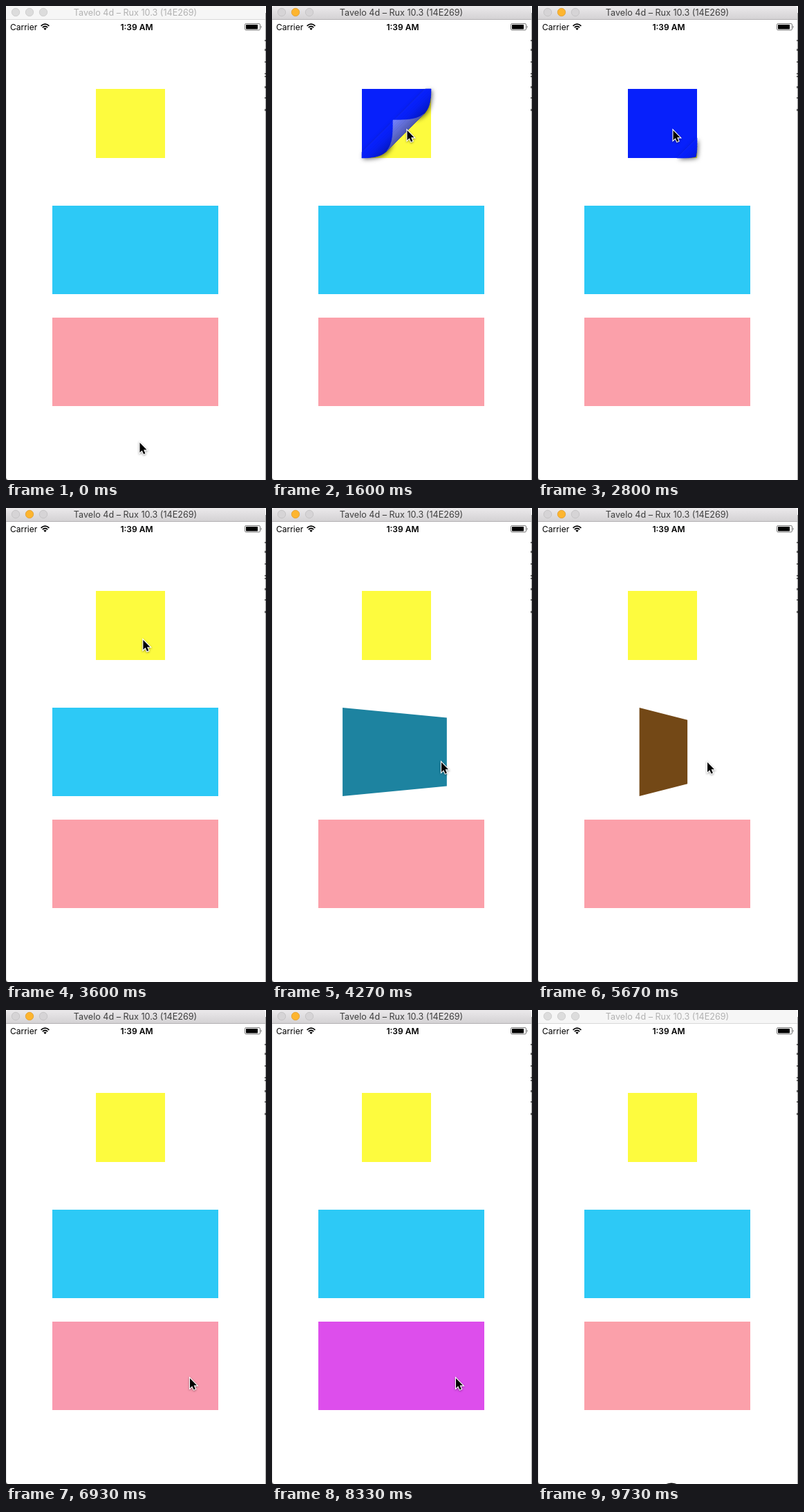
Recreate the animation shown at these times as an HTML page with a canvas. Size 376 by 686 pixels, loop 9790 ms.

```html
<!DOCTYPE html>
<html lang="en">
<head>
<meta charset="utf-8">
<title>View transitions</title>
<style>
  html, body { margin: 0; width: 100%; height: 100%; overflow: hidden; background: #fff; }
  svg, canvas { position: absolute; left: 0; top: 0; width: 376px; height: 686px; }
  text { font-family: Inter, "Liberation Sans", sans-serif; }
  #bar { fill: #f6f6f6; }
  #rule { fill: #d9d9d9; }
  #title { font-size: 12.6px; fill: #b1b1b1; text-anchor: middle; }
  .light { fill: #dcdcdc; stroke: #cacaca; stroke-width: .8; }
  .active #bar { fill: url(#metal); }
  .active #rule { fill: #b3b1b3; }
  .active #title { fill: #3d3d3d; }
  .active .light { fill: #d6d4d6; stroke: #c1bfc1; }
  .active #mini { fill: #fdb52f; stroke: #df9c2c; }
  .status { font-size: 12px; }
</style>
</head>
<body>
<svg id="chrome" viewBox="0 0 376 686">
  <defs>
    <linearGradient id="metal" x2="0" y2="1">
      <stop stop-color="#ebe9eb"/><stop offset="1" stop-color="#d3d1d3"/>
    </linearGradient>
  </defs>
  <path id="bar" d="M0 20V4Q0 0 4 0H371Q375 0 375 4V20Z"/>
  <rect id="rule" y="19" width="375" height="1"/>
  <circle class="light" cx="14" cy="9" r="5.7"/>
  <circle class="light" id="mini" cx="34" cy="9" r="5.7"/>
  <circle class="light" cx="54" cy="9" r="5.7"/>
  <text id="title" x="187" y="14">Tavelo 4d – Rux 10.3 (14E269)</text>

  <text class="status" x="6" y="34.6">Carrier</text>
  <text class="status" x="189" y="34.6" text-anchor="middle" font-weight="600">1:39 AM</text>
  <g fill="none" stroke="#000" stroke-width="1.7">
    <path d="M50.6 28.8Q56.5 23.4 62.4 28.8"/>
    <path d="M52.8 31.2Q56.5 27.8 60.2 31.2"/>
  </g>
  <path d="M54.3 32.6Q56.5 30.8 58.7 32.6L56.5 35Z"/>
  <rect x="345.5" y="25.5" width="22" height="9.4" rx="1.8" fill="#fff" stroke="#555" stroke-width=".8"/>
  <rect x="347" y="27" width="17" height="6.4" rx=".6"/>
  <path d="M368.8 28.4Q370.4 30.2 368.8 32Z"/>

  <path d="M375.5 10V686" stroke="#a5a5a5"/>
  <path d="M.25 20V686" stroke="#c4c4c4" stroke-width=".5"/>
  <path d="M375 49v2M375 62v3M375 80v2M375 97v2M375 101v2M375 116v3M375 132v2M375 149v3"
        stroke="#444" stroke-width="1.6"/>
  <path d="M0 682V686H3Q0 685 0 682Z" fill="#555"/>
</svg>
<canvas id="view"></canvas>
<script>
const LOOP = 9790, W = 376, H = 686;
const YELLOW = [253, 251, 62], BLUE = [7, 32, 251];
const CYAN = [45, 201, 246], ORANGE = [253, 159, 48];
const PINK = [251, 160, 170], ORCHID = [215, 60, 250], WHITE = [255, 255, 255];

const chrome = document.getElementById('chrome');
const view = document.getElementById('view');
const ctx = view.getContext('2d');
const dpr = window.devicePixelRatio || 1;
view.width = W * dpr;
view.height = H * dpr;

const clamp = v => Math.min(1, Math.max(0, v));
const lerp = (a, b, k) => a + (b - a) * k;
const mix = (a, b, k) => a.map((v, i) => lerp(v, b[i], k));
const rgb = (c, shade = 1) => `rgb(${c.map(v => Math.round(v * shade)).join()})`;

// cubic-bezier(.42, 0, .58, 1)
function ease(x) {
  let lo = 0, hi = 1, u = .5;
  for (let i = 0; i < 20; i++) {
    const bx = 3 * u * (1 - u) * (.42 * (1 - u) + .58 * u) + u ** 3;
    if (bx < x) lo = u; else hi = u;
    u = (lo + hi) / 2;
  }
  return u * u * (3 - 2 * u);
}
const step = (t, start, length = 1000) => ease(clamp((t - start) / length));

function box(x, y, w, h, color) {
  ctx.fillStyle = rgb(color);
  ctx.fillRect(x, y, w, h);
}

function trace(points) {
  points.forEach(([x, y], i) => i ? ctx.lineTo(x, y) : ctx.moveTo(x, y));
  ctx.closePath();
}

function polygon(points, fill) {
  ctx.beginPath();
  trace(points);
  ctx.fillStyle = fill;
  ctx.fill();
}

// ---- page curl: a square rolled on a diagonal cylinder ----
const SIZE = 100, DIAG = SIZE * Math.SQRT2, RADIUS = 24, END = -30;
const PAGE = [[0, 0], [SIZE, 0], [SIZE, SIZE], [0, SIZE]];
const along = p => (p[0] + p[1]) * Math.SQRT1_2;

// Keeps the part of a polygon where sign * (along - at) >= 0.
function cut(points, at, sign) {
  const out = [];
  points.forEach((p, i) => {
    const q = points[(i + 1) % points.length];
    const a = sign * (along(p) - at), b = sign * (along(q) - at);
    if (a >= 0) out.push(p);
    if (a * b < 0) out.push(mix(p, q, a / (a - b)));
  });
  return out;
}

function roll(p, line) {
  const s = along(p), d = s - line, half = Math.PI * RADIUS;
  const to = d < half ? line + RADIUS * Math.sin(d / RADIUS) : line - (d - half);
  const shift = (to - s) * Math.SQRT1_2;
  return [p[0] + shift, p[1] + shift];
}

// lifted: 0 = page lies flat, 1 = page is gone
function curl(x, y, under, page, lifted) {
  box(x, y, SIZE, SIZE, lifted > 0 ? under : page);
  if (lifted <= 0 || lifted >= 1) return;
  const line = lerp(DIAG, END, lifted);
  ctx.save();
  ctx.translate(x, y);
  ctx.globalAlpha = clamp((line - END) / 25);
  const flat = cut(PAGE, line, -1);
  if (flat.length > 2) polygon(flat, rgb(page));

  const strips = [];
  for (let d = 0; line + d < DIAG; d += 3) {
    const band = cut(cut(PAGE, line + d, 1), line + d + 3, -1);
    if (band.length > 2) strips.push({ d: d + 1.5, points: band.map(p => roll(p, line)) });
  }
  ctx.save();
  ctx.shadowColor = 'rgba(0,0,0,.55)';
  ctx.shadowBlur = 6 * dpr;
  ctx.shadowOffsetX = ctx.shadowOffsetY = 2 * dpr;
  ctx.beginPath();
  strips.forEach(s => trace(s.points));
  ctx.fillStyle = rgb(page);
  ctx.fill();
  ctx.restore();

  ctx.lineWidth = .6;
  for (const { d, points } of strips) {
    const turn = Math.min(d / RADIUS, Math.PI);
    const back = turn > Math.PI / 2;
    const color = back
      ? rgb(mix(page, WHITE, .45), 1 - .3 * Math.sin(turn))
      : rgb(page, 1 - .25 * Math.sin(turn) ** 2);
    polygon(points, color);
    ctx.strokeStyle = color;
    ctx.stroke();
  }
  ctx.restore();
}

// ---- card flip: the near edge stays in the plane of the screen ----
function flip(x, y, w, h, front, back, k) {
  const angle = k * Math.PI, depth = 584;
  const far = depth / (depth + w * Math.sin(angle));
  const first = k < .5, side = first ? -1 : 1;
  const cx = x + w / 2, cy = y + h / 2;
  const near = w / 2 * Math.abs(Math.cos(angle));
  const shade = 1 - 1.4 * Math.min(k, 1 - k);
  const xn = cx + side * near, xf = cx - side * near * far;
  const yn = h / 2, yf = yn * far;
  polygon([[xn, cy - yn], [xf, cy - yf], [xf, cy + yf], [xn, cy + yn]],
    rgb(first ? front : back, shade));
}

// ---- pointer: time, x, y ----
const TRAIL = [
  [70, 193.5, 632], [600, 195.5, 180],
  [3540, 195.5, 180], [3900, 245, 368],
  [6270, 245, 368], [6650, 266, 533],
  [9050, 266, 533], [9400, 194, 700]
];
const ARROW = [[0, 0], [0, 14.2], [3.2, 11.2], [5.6, 16.4], [7.9, 15.4], [5.6, 10.3], [10, 10.3]];

function pointer(t) {
  let i = 0;
  while (i < TRAIL.length - 2 && t >= TRAIL[i + 1][0]) i++;
  const [t0, x0, y0] = TRAIL[i], [t1, x1, y1] = TRAIL[i + 1];
  const k = step(t, t0, t1 - t0);
  ctx.save();
  ctx.translate(lerp(x0, x1, k), lerp(y0, y1, k));
  ctx.beginPath();
  trace(ARROW);
  ctx.lineJoin = 'miter';
  ctx.lineWidth = 2.2;
  ctx.strokeStyle = '#fff';
  ctx.shadowColor = 'rgba(0,0,0,.4)';
  ctx.shadowBlur = 3 * dpr;
  ctx.shadowOffsetY = dpr;
  ctx.stroke();
  ctx.shadowColor = 'transparent';
  ctx.fillStyle = '#000';
  ctx.fill();
  ctx.restore();
}

function draw(t) {
  chrome.classList.toggle('active', t >= 1000 && t < 9600);
  ctx.setTransform(dpr, 0, 0, dpr, 0, 0);
  ctx.clearRect(0, 0, W, H);

  const fade = step(t, 6760) - step(t, 8040);
  box(67, 451, 240, 128, mix(PINK, ORCHID, fade));

  if (t < 5000) flip(67, 289, 240, 128, CYAN, ORANGE, step(t, 3925));
  else flip(67, 289, 240, 128, ORANGE, CYAN, step(t, 5235));

  curl(130, 120, YELLOW, BLUE, t < 2300 ? 1 - step(t, 1070) : step(t, 2560));

  pointer(t);
  if (t >= 9670) {
    ctx.beginPath();
    ctx.ellipse(193, 698, 16, 13.6, 0, 0, 2 * Math.PI);
    ctx.fillStyle = '#000';
    ctx.fill();
  }
}

const begin = performance.now();
function tick() {
  draw((performance.now() - begin) % LOOP);
  requestAnimationFrame(tick);
}
tick();
</script>
</body>
</html>
```
